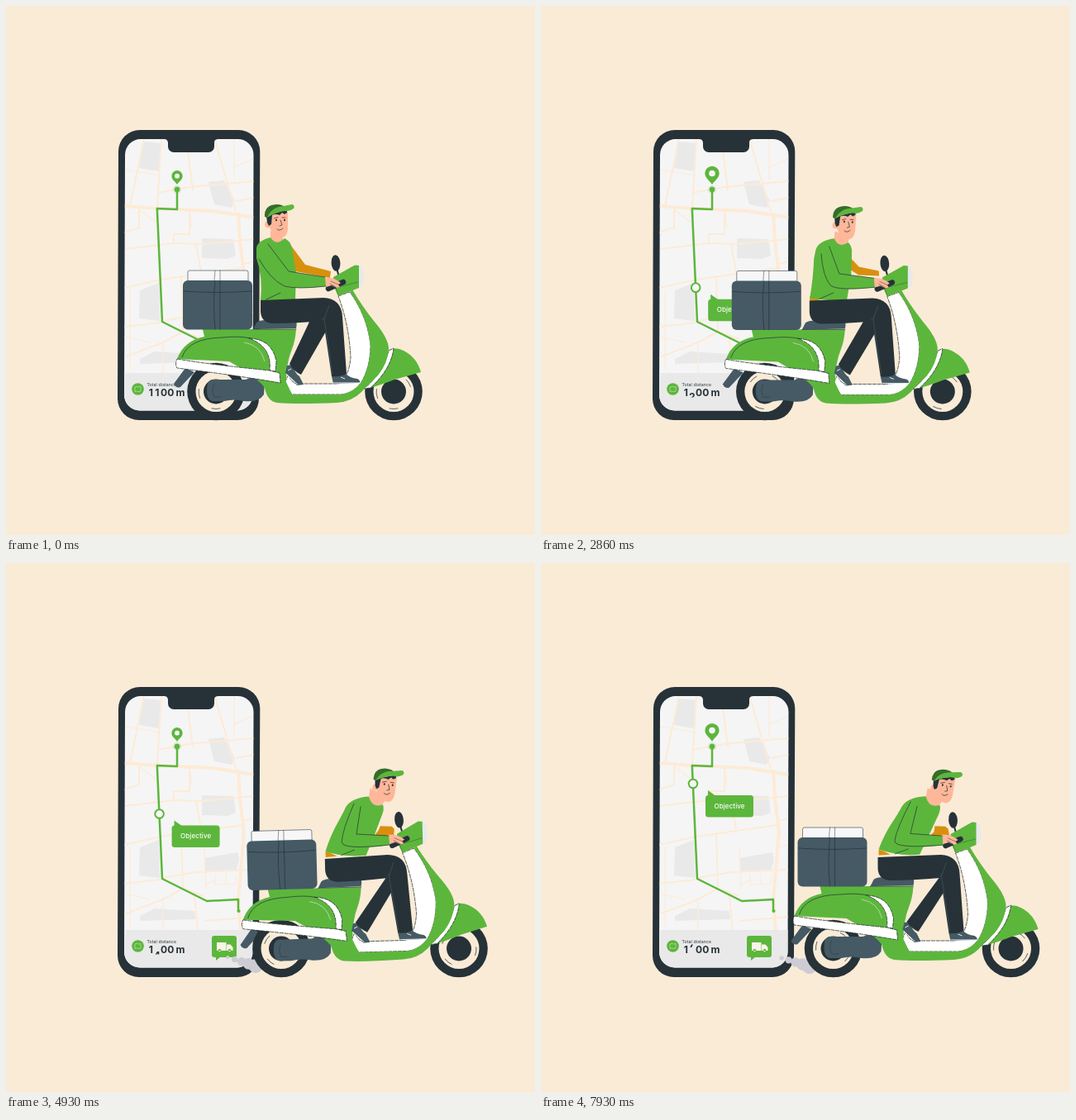
Animation of 640x640 px, one loop 8 s. Source, as an HTML page:

```html
<!DOCTYPE html>
<html lang="en">
<head>
<meta charset="utf-8">
<title>Scooter delivery</title>
<style>
html, body { margin: 0; width: 100%; height: 100%; overflow: hidden; background: #faebd7; }
svg { display: block; width: 100vw; height: 100vh; }
text { font-family: Inter, "Open Sans", sans-serif; }
.g { fill: #5cb63c; }
.d { fill: #263238; }
.s { fill: #455a64; }
.w { fill: #fff; }
.skin { fill: #ffb799; }
.edge { stroke: #15201a; stroke-width: .7; stroke-dasharray: 5 .8; }
.line { fill: none; stroke: #263238; stroke-width: .7; stroke-linecap: round; stroke-linejoin: round; }
.road { fill: none; stroke: #fdebd6; stroke-width: 2; }
.wide { stroke-width: 4; }
.thin { stroke-width: 1.2; }
.num { font-weight: 700; font-size: 12px; fill: #263238; text-anchor: middle; }
</style>
</head>
<body>
<svg viewBox="0 0 640 640">
<defs>
  <clipPath id="screen"><path d="M163 161H191Q196 161 196 166V170A7 7 0 0 0 203 177H245A7 7 0 0 0 252 170V166Q252 161 257 161H280A19 19 0 0 1 299.500 180L298.500 470A19 19 0 0 1 280 489.500H162A19 19 0 0 1 143 470L144 180A19 19 0 0 1 163 161Z"/></clipPath>
  <clipPath id="digit"><rect x="177.500" y="461.500" width="10" height="12"/></clipPath>
  <g id="wheel">
    <circle class="d" r="34.800"/>
    <circle r="24.500" fill="#faebd7"/>
    <circle class="d" r="15"/>
  </g>
  <path id="spokes" class="line" stroke-width="1.200" d="M-5 20.400A21 21 0 0 0 5 20.400M20.400 -6A21 21 0 0 0 15.200 -14.500M-20.700 -3A21 21 0 0 0 -19.500 8"/>
</defs>
<rect width="640" height="640" fill="#faebd7"/>
<path id="streak" stroke="#e8cb77" stroke-width="1"/>

<g id="phone">
  <path class="d" d="M162 150H281A26 26 0 0 1 307.300 176L306 475A26 26 0 0 1 280 501H161A26 26 0 0 1 135 475L136 176A26 26 0 0 1 162 150Z"/>
  <g clip-path="url(#screen)">
    <rect x="140" y="158" width="165" height="335" fill="#f5f5f5"/>
    <path fill="#e9e9e9" d="M165 164L187 166L185 200L161 196ZM245 213L264 211L277 236L273 244L252 240ZM237 281L275 282L278 302L268 306L237 305ZM162 344L185 335L186 381L161 378ZM240 357L280 350L282 358L279 371L241 374ZM162 427L180 418L228 421L229 431L162 433Z"/>
    <path class="road wide" d="M143 242L183 245L250 248L300 256M281 250L283 285L288 325L281 408L284 445"/>
    <path class="road" d="M167 160L150 242M188 160L183 243M144 294L203 287L237 288L300 282M161 245V268L143 274M203 287V276H222V248M218 160L226 223M183 226L222 219L300 212M252 160L278 249M143 341L187 331L287 317M230 288L236 322M212 327L214 395M187 383L143 388M190 381L230 374L300 371M288 312L300 309M143 425L190 407L214 394M214 394L240 403M228 403L232 445M240 433L300 428M278 236L300 232"/>
    <path class="road thin" d="M276 160V210M299 185L276 195M222 248L225 270M187 205L144 198M161 246L182 262M240 343L242 395M253 376V389H278V378M266 376V389M253 384L240 390M150 343V440M286 344L300 341M190 408V445M143 400L174 407"/>
    <rect x="140" y="444" width="165" height="50" fill="#e9e9e9"/>
  </g>
  <path fill="none" stroke="#5cb63c" stroke-width="2.500" stroke-linejoin="round" d="M207 222V246L182.800 245L189 382L243 409L281 407V421"/>
  <circle class="g" cx="281.500" cy="421" r="2"/>
  <circle class="g" cx="207" cy="222" r="5" opacity=".2"/>
  <circle class="g" cx="207" cy="222" r="3.200"/>
  <path id="pin" class="g" fill-rule="evenodd" d="M0 0C-3 -5 -9 -8 -9 -14A9 9 0 0 1 9 -14C9 -8 3 -5 0 0ZM-4 -14A4 4 0 0 0 4 -14A4 4 0 0 0 -4 -14Z"/>
  <circle id="marker" r="5.300" fill="#f7f7f4" stroke="#5cb63c" stroke-width="2"/>
  <g id="bubble">
    <rect class="g" y="0" width="58" height="26.500" rx="3.500"/>
    <path class="g" d="M3 -6V4H17Z"/>
    <text x="10.500" y="15.800" font-size="8" font-weight="500" letter-spacing=".1" fill="#fff">Objective</text>
  </g>
  <circle class="g" cx="159.500" cy="463.500" r="7.300"/>
  <path d="M156 461L158 460.500L161 461L163 460.500V466L161 466.500L158 466L156 466.500Z" fill="none" stroke="#cfe8c4" stroke-width=".6"/>
  <text x="170.500" y="460" font-size="5.200" letter-spacing=".1" fill="#263238">Total distance</text>
  <text class="num" x="175.300" y="472">1</text>
  <g clip-path="url(#digit)"><text id="roll" class="num" x="182.800"></text></g>
  <text class="num" x="191" y="472">0</text>
  <text class="num" x="199.300" y="472">0</text>
  <text class="num" x="211" y="472">m</text>
  <rect class="g" x="249" y="451" width="30" height="26" rx="3"/>
  <path class="g" d="M254 476V481L260 476Z"/>
  <path fill="#faf3e8" d="M255 459H266.500V469H255ZM267 461.500H271.500L274.500 465V469H267Z"/>
  <path class="g" d="M256.500 469a2 2 0 0 1 4 0ZM268.500 469a2 2 0 0 1 4 0Z"/>
  <path fill="#faf3e8" d="M257.300 469a1.200 1.200 0 1 0 2.400 0ZM269.300 469a1.200 1.200 0 1 0 2.400 0Z"/>
</g>

<g id="smoke" fill="#cdccd5"></g>

<g id="ride">
  <path class="s pitch" d="M217 438L203 457Q206 463 211 461L228 443Z"/>
  <use href="#wheel" x="254" y="466.500"/>
  <use href="#wheel" x="469" y="466.500"/>
  <use class="spin" href="#spokes"/>
  <use class="spin" href="#spokes"/>
  <g class="pitch">
    <path class="s" d="M249 452H290Q305 444 313 455L312 470Q306 480 288 478Q276 475 264 478H250Q243 477 243 465Q243 453 249 452Z"/>
    <path class="line" d="M252 457Q248 465 252 473H260" opacity=".6"/>
    <path class="g" d="M433 462Q457 443 464 416Q472 412 481 417Q497 425 502 443L470 452Q452 459 437 463Z"/>
    <path class="w edge" d="M463 417L469 414Q466 439 441 462L433 463Q456 444 463 417Z"/>
    <path class="w edge" d="M402 351L416 346Q437 375 441 410Q441 436 430 455Q420 469 405 470H346L337 456L342 446Q346 458 354 457H402Q415 450 417 425Q415 385 402 351Z"/>
    <path class="g" d="M238 391H351Q350 405 346 415Q339 432 339 455L346 470H405Q420 468 430 455Q441 436 441 410Q437 375 416 346L419 343Q430 362 445 381Q463 402 463 415Q462 432 450 447Q436 460 430 467Q418 479 400 480Q352 482 328 480Q316 478 313 462Q305 450 270 430L207 427Q215 405 240 400Z"/>
    <path class="line" d="M213 425Q220 402 262 401Q282 399 296 402Q313 408 320 422"/>
    <path class="w edge" d="M294 402Q322 403 327 430L326 442L319 441Q322 412 294 402Z"/>
    <path class="w edge" d="M207 427Q240 433 319 441L331 444L332 456Q280 447 207 438Q204 433 207 427Z"/>
    <path d="M288 407Q308 410 313 430" fill="none" stroke="#bfe3b0" stroke-width=".8"/>
    <path class="s" d="M299 391L303 383Q306 380 315 380H349Q353 381 351 390Z"/>
    <path class="line" d="M299 391H351"/>
    <path class="line" style="stroke-width:2" d="M400 317L404 332"/>
    <ellipse class="d" cx="399" cy="311" rx="5.400" ry="9.800" transform="rotate(-4 399 311)"/>
    <path fill="#e8e9ea" d="M426 313Q433 315 433 327Q433 340 427 341Z"/>
    <path class="g" d="M396 328L422 313.500L427 314V341L402 351L397 340Z"/>
    <path class="line" opacity=".5" d="M402 350L399 341L426 334"/>
    <g id="box">
      <rect x="220" y="320" width="73" height="16" rx="2" fill="#f7f7f7" stroke="#455a64" stroke-width=".7"/>
      <rect class="s" x="214" y="332" width="84" height="59.500" rx="6"/>
      <path class="line" d="M215 345Q255 348 297 345M253 333Q250 360 253 391M259 333V391"/>
      <path class="line" opacity=".7" d="M253 320L252 332M259 320V332"/>
    </g>
    <path class="s" d="M340 435L346 434Q350 445 355 448L360 458L352 459Q346 450 338 444Z"/>
    <path class="s" d="M394 448L411 445Q416 450 425 451Q429 453 428 456L396 457Z"/>
    <path d="M339 445L353 458M396 456H428M341 441L345 439M405 449L410 451" fill="none" stroke="#fff" stroke-width=".9"/>
    <path id="farLeg" class="d"/>
    <path id="farArm" fill="#d8900c"/>
    <path id="hem" fill="#d8900c"/>
    <path id="neck" class="skin"/>
    <path id="torso" class="g"/>
    <path class="d" d="M308 356L384 353Q406 354 407 376L412 445Q404 449 394 448L384 381Q350 384 322 384Q309 383 308 370Z"/>
    <path d="M382 380L386 376M391 362L385 379L395 445" fill="none" stroke="#53636a" stroke-width=".5"/>
    <path class="line" style="stroke-width:6.500" d="M390 342L408 334"/>
    <path class="skin" d="M384 329Q395 327 405 335L402 337L404 340L400 341L394 338L387 340Z"/>
    <path class="line" style="stroke-width:.5" d="M393 333L402 337M392 336L399 340"/>
    <path id="arm" class="g"/>
    <path id="folds" class="line"/>
    <g id="head">
      <path class="skin" d="M318 252L341 249L341 270Q340 279 334 280Q323 279 319 268Q313 269 313 264Q314 259 318 261Z"/>
      <path class="d" d="M315 254L340 246L340 250L337 252L334 250L331 253Q326 251 322 253L321 264L318 266L316 262Z"/>
      <path fill="#356d2b" d="M313 255Q312 241 327 240Q335 240 338 244Q323 248 316 256Z"/>
      <path class="g" d="M316 256Q321 243 336 242L346 240Q350 241 348 245Q343 249 337 248Q327 249 316 256Z"/>
      <path class="line" d="M324.500 257L329 255.500M334 256L338 256M332 259L334 265L331 266M328 270Q331 273 335 269"/>
      <path class="d" d="M326 259a1 1.300 0 1 0 2 0a1 1.300 0 1 0 -2 0M336 259a1 1.300 0 1 0 2 0a1 1.300 0 1 0 -2 0"/>
    </g>
  </g>
</g>
</svg>

<script>
const LOOP = 8000;
const $ = id => document.getElementById(id);
const set = (el, name, value) => el.setAttribute(name, value);
const clamp = v => Math.max(0, Math.min(1, v));

// Smooth curve through [time, value] points, flat at local extremes.
function track(...pts) {
  const slope = i => (pts[i + 1][1] - pts[i][1]) / (pts[i + 1][0] - pts[i][0]);
  const tan = pts.map((_, i) => {
    if (!i) return slope(0);
    if (i === pts.length - 1) return slope(i - 1);
    const a = slope(i - 1), b = slope(i);
    return a * b <= 0 ? 0 : 2 * a * b / (a + b);
  });
  return t => {
    const last = pts.length - 1;
    if (t >= pts[last][0]) return pts[last][1] + tan[last] * (t - pts[last][0]);
    let i = 0;
    while (t >= pts[i + 1][0]) i++;
    const h = pts[i + 1][0] - pts[i][0], s = (t - pts[i][0]) / h, q = 1 - s;
    return pts[i][1] * q * q * (1 + 2 * s) + pts[i + 1][1] * s * s * (3 - 2 * s)
      + h * s * q * (tan[i] * q - tan[i + 1] * s);
  };
}

const rideX = track([0, 0], [1210, 7], [2290, 14], [3500, 21.2], [4930, 79], [5140, 89],
  [5700, 104], [6790, 112.5], [6930, 113], [7350, 111.5], [7710, 106], [7930, 99.5]);
const pitch = track([0, 0], [3500, 0], [4500, 1.55], [6930, 1.55], [7800, 0], [7930, 0]);
const lean = track([0, 0], [1210, 0], [2290, .14], [3500, .75], [4930, 1], [6790, 1.03], [7930, 1.07]);
const boxX = track([0, 0], [4930, 0], [6790, -2.2], [7930, -3]);
const markerY = track([0, 358], [1210, 354], [2290, 346], [3500, 333], [4930, 303.5], [6790, 278.5], [7930, 267]);
const pinH = track([0, 17], [880, 26], [1210, 23], [1700, 17.5], [2290, 19], [2700, 23], [3500, 15],
  [4000, 19], [4500, 17], [6900, 17], [7710, 19.5], [7930, 22]);
const hundreds = track([0, 1], [1700, 1], [2290, 1.42], [3500, 2], [4930, 3.6], [6790, 5.92], [7930, 7.42]);
const streaks = [720, 3900, 5500, 6760];

// Upright and bent shapes with matching commands.
const poses = {
  farLeg: ["M368 380L343 433Q348 442 357 446L388 392L390 368Z",
           "M384 377L343 434Q348 442 357 446L389 396L392 368Z"],
  farArm: ["M345 290L362 313L393 321L392 329L350 321L346 308Z",
           "M374 323L376 318L390 319L393 322L392 331L368 330L368 328Z"],
  hem: ["M308 354L312 352L320 358L308 360Z", "M309 347L313 348L323 353L309 354Z"],
  neck: ["M320 272L335 276L335 285Q333 291 327 290Q321 288 320 280Z",
         "M365 272L386 283L382 289Q376 297 371 297Q364 291 363 284Z"],
  torso: ["M303 293Q304 284 320 280Q327 291 337 281Q344 284 346 293L351 322L350 356Q328 359 308 357Q311 328 303 305Z",
          "M333 298Q339 283 363 282Q367 297 380 292Q382 298 378 306L369 328L358 353Q330 355 309 347Q315 328 328 307Z"],
  arm: ["M304 292Q310 285 319 291L342 321L386 328L387 339Q352 343 337 339Q320 331 306 306Z",
        "M339 290Q347 283 354 293L347 327L386 330L387 341Q346 346 333 342Q327 338 331 322Z"],
  folds: ["M317 288L342 321L386 328M306 306Q320 331 337 339Q352 343 387 339M315 355L332 347",
          "M353 294L347 327L386 330M345 290Q330 322 329 336Q329 346 387 341M328 352L344 346"]
};
const NUM = /-?[\d.]+/g;
function mix([a, b], u) {
  const ends = b.match(NUM);
  let i = 0;
  return a.replace(NUM, v => (+v + (ends[i++] - v) * u).toFixed(2));
}

const puffs = Array.from({ length: 5 }, () =>
  $("smoke").appendChild(document.createElementNS("http://www.w3.org/2000/svg", "circle")));
const spins = document.querySelectorAll(".spin");
const pitched = document.querySelectorAll(".pitch");

function drawPhone(t) {
  set($("pin"), "transform", `translate(207 216) scale(${pinH(t) / 23})`);

  const y = markerY(t), x = 183 + (y - 245) * 6 / 137, fade = clamp((t - 1050) / 500);
  set($("marker"), "cx", x);
  set($("marker"), "cy", y);
  set($("marker"), "opacity", fade);
  set($("marker"), "stroke", t < 1350 ? "#bcc9b5" : "#5cb63c");
  set($("bubble"), "transform", `translate(${x + 15} ${y + 14}) scale(${clamp((t - 750) / 420)})`);

  const v = hundreds(t), frac = v - Math.floor(v), next = frac > .5;
  $("roll").textContent = (Math.floor(v) + next) % 10;
  set($("roll"), "y", 472 - (frac - next) * 17);
}

function drawSmoke(t, x) {
  const grow = clamp((t - 2900) / 1200);
  puffs.forEach((c, i) => {
    const p = (t / 1400 + i / puffs.length) % 1;
    set(c, "cx", 254 + x - 26 - 42 * p);
    set(c, "cy", 489 - 13 * p);
    set(c, "r", grow * (1.5 + 8 * (1 - p)));
  });
}

function drawRide(t, x) {
  const bob = .55 - .55 * Math.cos(t / 880 * 2 * Math.PI), tilt = pitch(t), u = lean(t);
  set($("ride"), "transform", `translate(${x} 0)`);
  pitched.forEach(el => set(el, "transform", `translate(${tilt} ${bob * .8}) rotate(${-tilt} 354 460)`));
  set($("box"), "transform", `translate(${boxX(t)} 0)`);
  spins.forEach((s, i) => set(s, "transform", `translate(${254 + i * 215} 466.5) rotate(${t * .3})`));
  for (const id in poses) set($(id), "d", mix(poses[id], u));
  set($("head"), "transform", `translate(${55 * u} ${8.5 * u * u}) rotate(${9 * u} 328 262)`);
}

function draw(t) {
  const x = rideX(t);
  const start = streaks.find(s => t >= s && t < s + 450);
  const head = 640 - (t - start);
  set($("streak"), "d", start === undefined ? "" : `M${head} 358.5h60`);
  drawPhone(t);
  drawSmoke(t, x);
  drawRide(t, x);
}

let begin;
function tick(now) {
  begin ??= now;
  draw((now - begin) % LOOP);
  requestAnimationFrame(tick);
}
draw(0);
requestAnimationFrame(tick);
</script>
</body>
</html>
```
